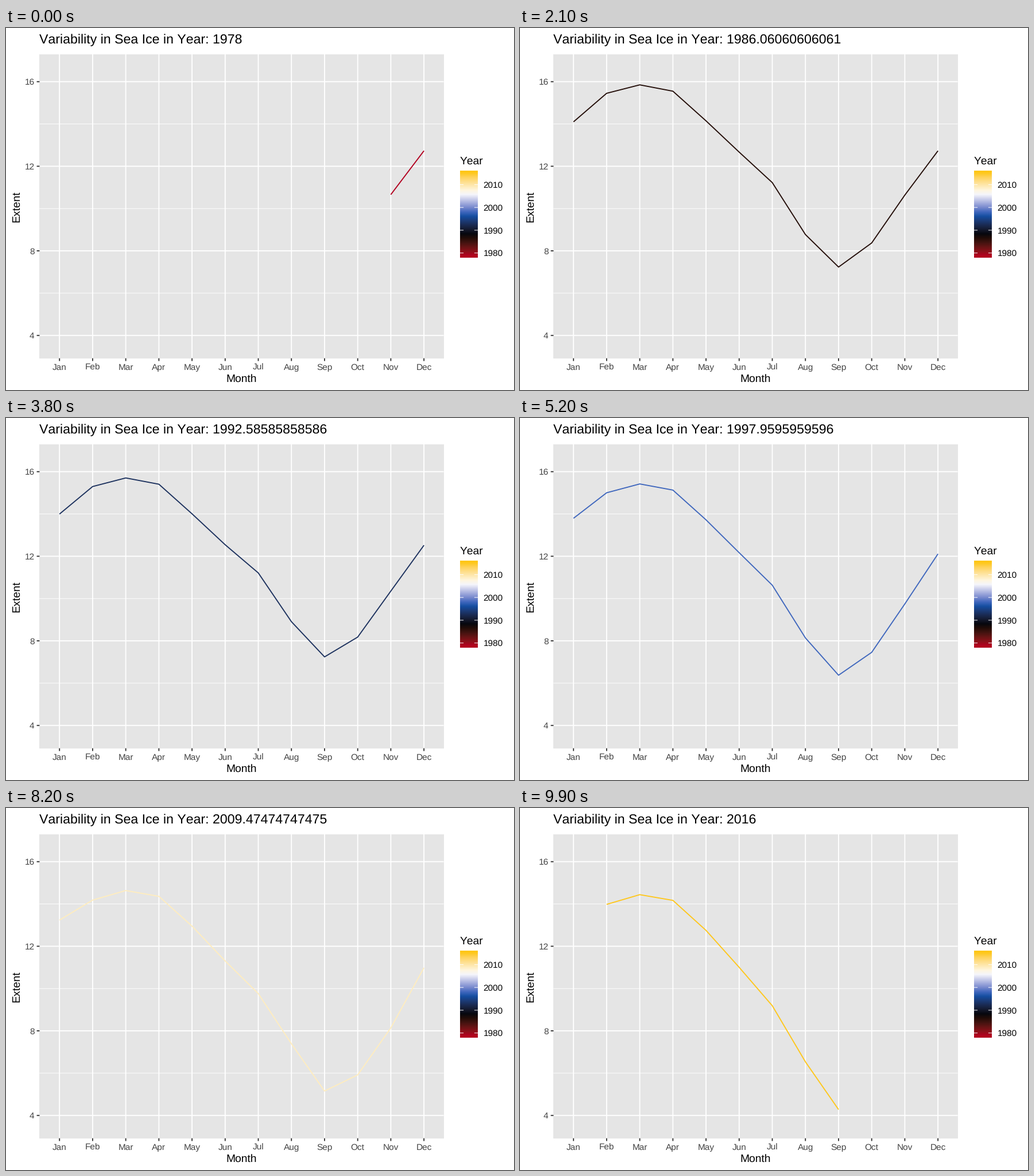
A matplotlib script for the animation above (10 s loop, 885 by 632 pixels).

```python
import numpy as np
import matplotlib.pyplot as plt
from matplotlib.animation import FuncAnimation
from matplotlib.patches import Rectangle

W, H = 885, 632
FRAMES = 100
FIRST, LAST = 1978, 2016
MONTHS = "Jan Feb Mar Apr May Jun Jul Aug Sep Oct Nov Dec".split()
M = np.arange(12)

plt.rcParams.update({
    "font.family": "Liberation Sans",
    "text.hinting": "none",
    "text.kerning_factor": 6,
    "lines.solid_capstyle": "butt",
    "lines.solid_joinstyle": "round",
})

# Seasonal curve before the decline and at its end
EARLY = np.array([14.1, 15.45, 15.85, 15.55, 14.15, 12.7, 11.35, 9.0, 7.43, 8.45, 10.65, 12.73])
LATE = np.array([13.1, 13.98, 14.44, 14.17, 12.75, 11.0, 9.17, 6.5, 4.25, 5.3, 7.7, 10.7])
DECLINE_START = 1986
OBSERVED = {FIRST: (10, 12), LAST: (1, 9)}


def extent(year):
    """Months and values: a smooth decline plus a recurring swing in summer."""
    p = np.clip((year - DECLINE_START) / (LAST - DECLINE_START), 0, 1)
    decline = p * p * (3 - 2 * p)
    swing = -.6 * np.cos(2 * np.pi * (year - 2012) / 5.4)
    summer = np.exp(-((M - 7.3) / 1.6) ** 2)
    v = EARLY + (LATE - EARLY) * decline + swing * summer
    seen = slice(*OBSERVED.get(year, (0, 12)))
    return M[seen], v[seen]


# Colour scale, blended in CIE Lab
STOPS = np.array([[178, 0, 30], [0, 0, 0], [13, 87, 181],
                  [255, 255, 255], [255, 199, 26]]) / 255
TO_XYZ = np.array([[.4124, .3576, .1805], [.2126, .7152, .0722], [.0193, .1192, .9505]])
WHITE = TO_XYZ.sum(axis=1)


def to_lab(rgb):
    lin = np.where(rgb > .04045, ((rgb + .055) / 1.055) ** 2.4, rgb / 12.92)
    t = lin @ TO_XYZ.T / WHITE
    return np.where(t > .008856, np.cbrt(t), 7.787 * t + 16 / 116)


def to_rgb(f):
    t = np.where(f > .2069, f ** 3, (f - 16 / 116) / 7.787)
    lin = np.clip((t * WHITE) @ np.linalg.inv(TO_XYZ).T, 0, 1)
    return np.clip(np.where(lin > .0031308, 1.055 * lin ** (1 / 2.4) - .055, 12.92 * lin), 0, 1)


LAB = to_lab(STOPS)


def colour(year):
    p = (np.asarray(year, float) - FIRST) / (LAST - FIRST)
    f = [np.interp(p, np.linspace(0, 1, 5), LAB[:, c]) for c in range(3)]
    return to_rgb(np.stack(f, axis=-1))


fig = plt.figure(figsize=(W / 100, H / 100), dpi=100, facecolor="white")
ax = fig.add_axes([0, 0, 1, 1])
ax.set_axis_off()

LEFT, RIGHT, TOP, BOTTOM = 58.4, 762.6, 46, 576.6


def xpos(m):
    return 93.2 + 57.72 * m


def ypos(v):
    return 93.7 + (16 - v) * 36.92


def rule(x, y, color, lw, z=2):
    return ax.plot(x, y, color=color, lw=lw * .72, zorder=z, snap=False)[0]


def label(x, y, s, size, color="black", **kw):
    return ax.text(x, y, s, fontsize=size * .72, color=color, va="baseline", **kw)


SMALL, MEDIUM, LARGE = 15.43, 19.3, 23.15
THIN, THICK = .95, 1.87
GREY, TICK = "#444444", "#333333"

# Panel, grid and axes
ax.add_patch(Rectangle((LEFT, TOP), RIGHT - LEFT, BOTTOM - TOP, fc="#E5E5E5", lw=0, zorder=1))
for v in (6, 10, 14):
    rule([LEFT, RIGHT], [ypos(v)] * 2, "white", THIN)
for v in (4, 8, 12, 16):
    rule([LEFT, RIGHT], [ypos(v)] * 2, "white", THICK)
    rule([LEFT - 4.8, LEFT], [ypos(v)] * 2, TICK, THICK)
    label(49.5, ypos(v) + 5.5, str(v), SMALL, GREY, ha="right")
for m, name in enumerate(MONTHS):
    x = xpos(m)
    rule([x, x], [TOP, BOTTOM], "white", THICK)
    rule([x, x], [BOTTOM, BOTTOM + 4.8], TICK, THICK)
    label(x, 596.7, name, SMALL, GREY, ha="center")
label(410.5, 617.8, "Month", MEDIUM, ha="center")
label(23.3, 311.3, "Extent", MEDIUM, ha="center", rotation=90, rotation_mode="anchor")

# Legend
BX0, BX1, BY0, BY1 = 791, 822, 249, 401
label(791, 237.8, "Year", MEDIUM)
bar = colour(np.linspace(LAST, FIRST, 20))[:, None, :]
ax.imshow(bar, extent=(BX0, BX1, BY1, BY0), aspect="auto", interpolation="bilinear", zorder=2)
for yr in (1980, 1990, 2000, 2010):
    y = 392.8 - (yr - 1980) * 3.98
    rule([BX0, BX0 + 6.1], [y, y], "white", THIN, 3)
    rule([BX1 - 6.1, BX1], [y, y], "white", THIN, 3)
    label(831.5, y + 5.5, str(yr), SMALL)

title = label(58.3, 26.8, "", LARGE)
curve = rule([], [], "black", THICK, 4)
ax.set_xlim(0, W)
ax.set_ylim(H, 0)


def draw(i):
    t = FIRST + (LAST - FIRST) * i / (FRAMES - 1)
    months, values = extent(int(t))
    title.set_text(f"Variability in Sea Ice in Year: {t:.15g}")
    curve.set_data(xpos(months), ypos(values))
    curve.set_color(tuple(colour(t)))
    return title, curve


anim = FuncAnimation(fig, draw, frames=FRAMES, interval=100, repeat=True, repeat_delay=0)
plt.show()
```
